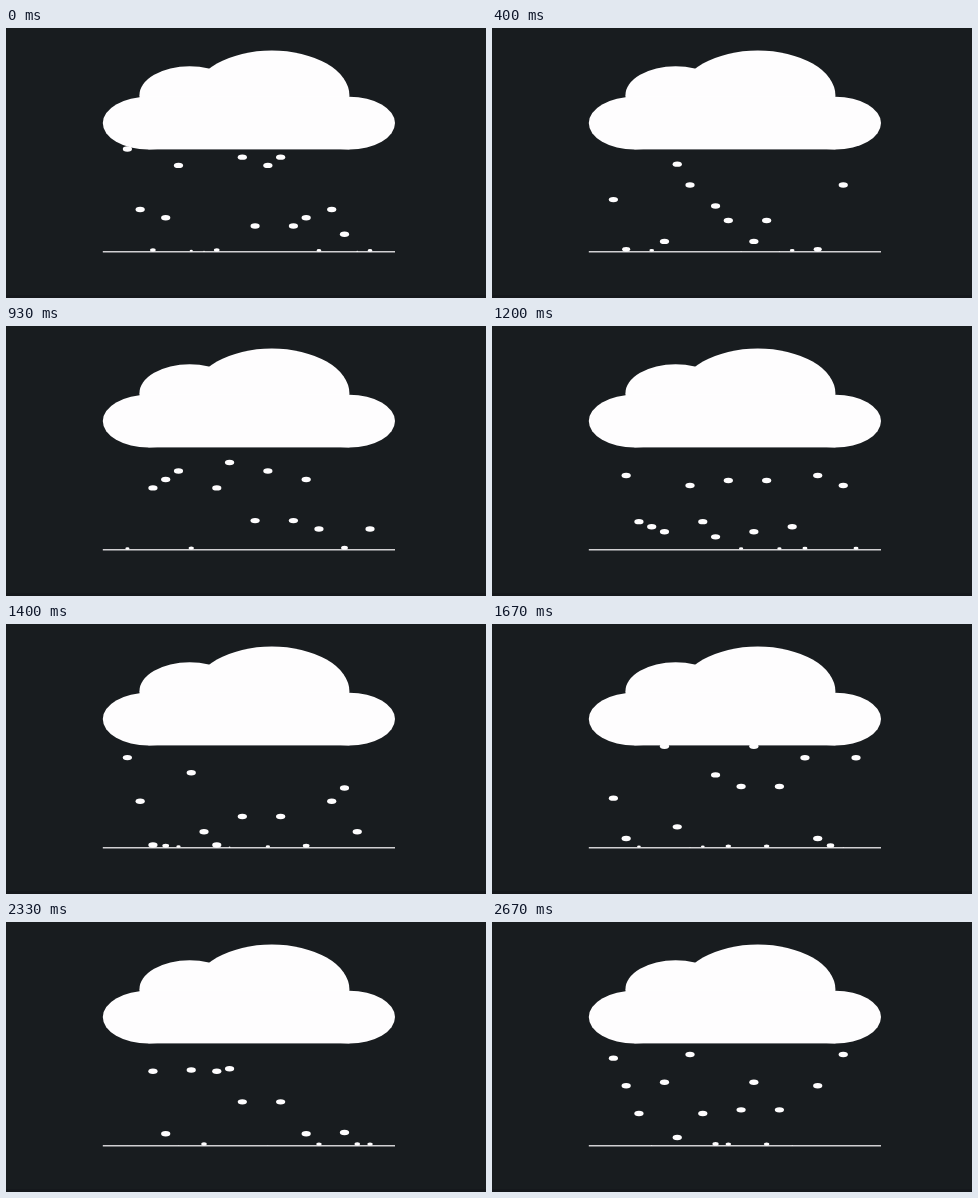
Write an HTML page with a canvas that moves like this. It is 480 px wide and 270 px high and loops after 2740 ms.

```html
<!DOCTYPE html>
<html lang="en">
<head>
<meta charset="utf-8">
<title>Rain cloud</title>
<style>
  html, body { margin: 0; width: 100%; height: 100%; overflow: hidden; background: #181c1f; }
  canvas { display: block; }
</style>
</head>
<body>
<canvas id="stage" width="480" height="270"></canvas>
<script>
const ctx = document.getElementById('stage').getContext('2d');

const LOOP = 2740;
const STEP = 200 / 3;        // the motion advances at 15 steps per second
const LAST_STEP = 40;
const RAIN_AGE = 10150;      // how long it has rained when the loop starts
const FALL = 0.7;            // share of a cycle spent falling, the rest is shrinking
const START_Y = 88, REST_Y = 221;
const RX = 4.6, RY = 2.7;

// Each drop completes this many cycles in 15 seconds.
const speeds = [12, 11, 10, 14, 18, 16, 19, 10, 22, 15, 17, 18, 15, 17, 14, 13, 11, 20, 19, 13];

function ellipse(x, y, rx, ry) {
  ctx.beginPath();
  ctx.ellipse(x, y, rx, ry, 0, 0, 2 * Math.PI);
  ctx.fill();
}

function drawCloud() {
  ellipse(183.6, 67.3, 50.2, 29);
  ellipse(265.8, 67.3, 77.6, 44.8);
  ellipse(142.4, 95.1, 45.6, 26.3);
  ellipse(343.4, 95.1, 45.6, 26.3);
  ctx.fillRect(142.4, 68.8, 201, 52.6);
}

function drawDrop(speed, column, age) {
  const phase = speed * age / 15000 % 1;
  const fall = Math.min(phase / FALL, 1);
  const size = Math.min((1 - phase) / (1 - FALL), 1);
  const bottom = START_Y + (REST_Y - START_Y) * fall + RY;
  ellipse(121.4 + 12.77 * column, bottom - RY * size, RX * size, RY * size);
}

function render(time) {
  let step = Math.min(Math.floor((time + 3.4) / STEP), LAST_STEP);
  if (step < 6) step = 1 + step * 5 / 6;   // slower opening
  const age = RAIN_AGE + step * STEP;

  ctx.fillStyle = '#181c1f';
  ctx.fillRect(0, 0, 480, 270);
  ctx.fillStyle = '#15181c';
  ctx.fillRect(0, 267, 480, 3);

  ctx.fillStyle = '#fefdfe';
  drawCloud();
  ctx.fillRect(96.8, 223.2, 292.2, 1.2);
  speeds.forEach((speed, column) => drawDrop(speed, column, age));
}

function tick() {
  render(performance.now() % LOOP);
  requestAnimationFrame(tick);
}
tick();
</script>
</body>
</html>
```
